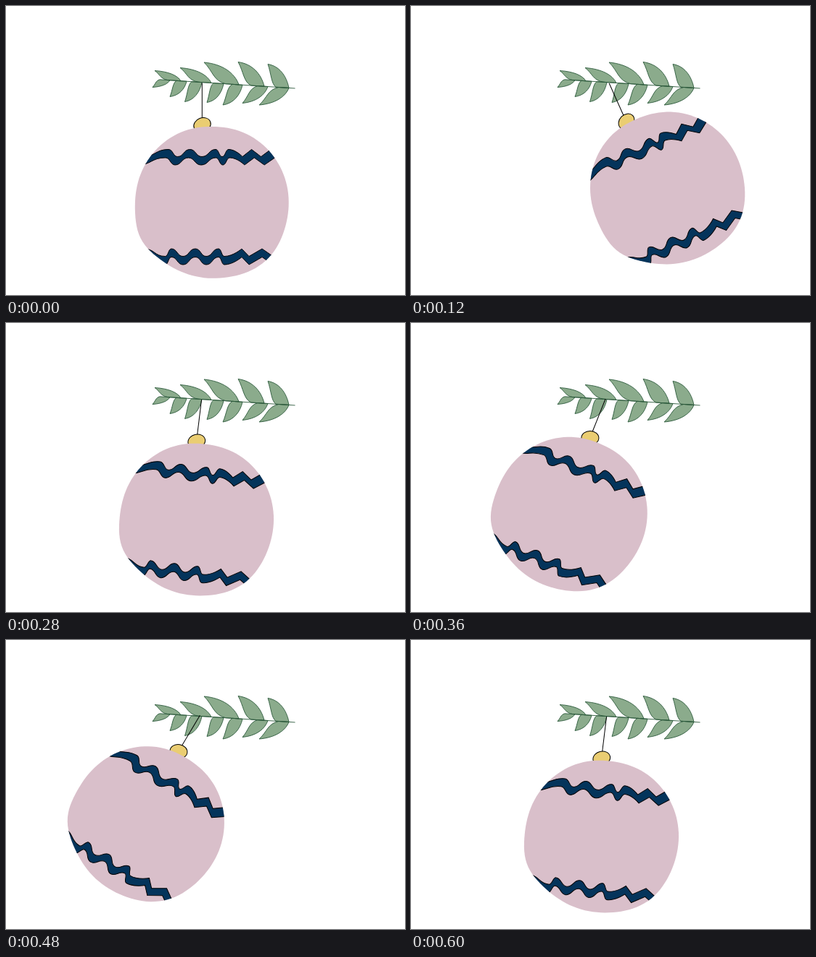
Recreate the animation shown at these times as an HTML page. Size 550 px wide and 400 px high, loop 0.64 s.

```html
<!DOCTYPE html>
<html lang="en">
<head>
<meta charset="utf-8">
<title>Swinging bauble</title>
<style>
  html, body { margin: 0; width: 100%; height: 100%; overflow: hidden; background: #fff; }
  svg { display: block; width: 100%; height: 100%; }
  #branch { fill: #8bab8c; stroke: #2c5a3c; stroke-width: .9; stroke-linejoin: round; }
  #cap { fill: #eacd72; }
  #ribbons { fill: #04345b; }
  .ball { fill: #d9bfca; }
  .line { stroke: #000; }
</style>
</head>
<body>
<svg viewBox="0 0 550 400">
  <clipPath id="clip"><path class="ball"/></clipPath>
  <path id="branch"/>
  <g id="bauble">
    <path class="line" d="M270.300 106.500V156"/>
    <ellipse id="cap" class="line" cx="270.500" cy="164.500" rx="12" ry="9.600"
      transform="rotate(-21 270.500 164.500)"/>
    <path class="ball"/>
    <g clip-path="url(#clip)"><path id="ribbons" class="line"/></g>
  </g>
</svg>
<script>
const get = id => document.getElementById(id);
const stemY = x => 102.5 + (x - 222) * .065;

// A leaf from its tip to a base of the given width that ends at x on the stem
function leaf(tipX, tipY, x, width) {
  const at = (baseX, u, v) =>
    [tipX + (baseX - tipX) * u, tipY + (stemY(baseX) - tipY) * v];
  const inner = x - width;
  return `M${tipX} ${tipY}C${at(x, .54, .08)} ${at(x, .88, .48)} ${at(x, 1, 1)}` +
    `L${at(inner, 1, 1)}C${at(inner, .42, .86)} ${at(inner, .42, .42)} ${tipX} ${tipY}Z`;
}

const upper = [[205, 89.5, 241], [240, 85.5, 283], [273, 78, 321], [320, 77.5, 356], [361, 80.5, 390]];
const lower = [[202, 112.5, 226], [226, 125.5, 249], [246.5, 132.5, 270], [277, 133.5, 300],
  [299, 137, 326], [326, 134.5, 361], [349, 137, 390]];
get('branch').setAttribute('d',
  upper.map(p => leaf(...p, 18)).join('') +
  lower.map(p => leaf(...p, 14)).join('') +
  `M222 ${stemY(222)}L398.5 ${stemY(398.5)}`);

// A circle with two soft corners at the bottom and a flattened top
const bump = (angle, centre, width) => Math.exp(-(((angle - centre) / width) ** 2));
let outline = '';
for (let a = -120; a < 240; a += 3) {
  const r = 105.6 + 4.5 * bump(a, 48, 25) + 5 * bump(a, 152, 18) - 1.5 * bump(a, -88, 20);
  const t = a * Math.PI / 180;
  outline += (outline ? 'L' : 'M') + [284 + r * Math.cos(t), 271 + r * Math.sin(t)];
}
for (const el of document.querySelectorAll('.ball')) el.setAttribute('d', outline + 'Z');

// Joins turning points with waves where they are round, straight lines where sharp
const edge = pts => pts.slice(1).map((b, i) => {
  const a = pts[i], mid = (a.x + b.x) / 2;
  const handle = p => `${p.round ? mid : p.x} ${p.y}`;
  return `C${handle(a)} ${handle(b)} ${b.x} ${b.y}`;
}).join('');

// Turning points alternate between two heights; the lower edge repeats the upper one
function ribbon(xs, even, odd, lean) {
  const top = xs.map((x, i) => ({ x, y: i % 2 ? odd : even, round: i < 8 }));
  const bottom = top.map(p => ({ ...p, x: p.x + (p.x - 285) * lean, y: p.y + 11.5 })).reverse();
  return `M${top[0].x} ${top[0].y}${edge(top)}L${bottom[0].x} ${bottom[0].y}${edge(bottom)}Z`;
}

get('ribbons').setAttribute('d',
  ribbon([188, 224, 236.5, 253.5, 270, 289, 298, 307, 326, 338.5, 351.5, 365], 208.5, 198.5, .07) +
  ribbon([190, 219.5, 228, 244, 261, 276, 293, 301, 325, 335, 353, 368], 336, 346.5, 0));

// Speeds up towards the peak, then returns the same way
function swing(peak, length, step) {
  const f = 1 - Math.abs(step / length - 1);
  return peak * (.82 * f + .18 * f ** 4);
}

function draw(time) {
  const step = Math.floor(time / 40) % 16;
  const angle = step < 6 ? swing(-24, 3, step) : swing(42, 5, step - 6);
  get('bauble').setAttribute('transform', `rotate(${angle} 273 100)`);
}

const start = performance.now();
(function loop() {
  draw(performance.now() - start);
  requestAnimationFrame(loop);
})();
</script>
</body>
</html>
```
